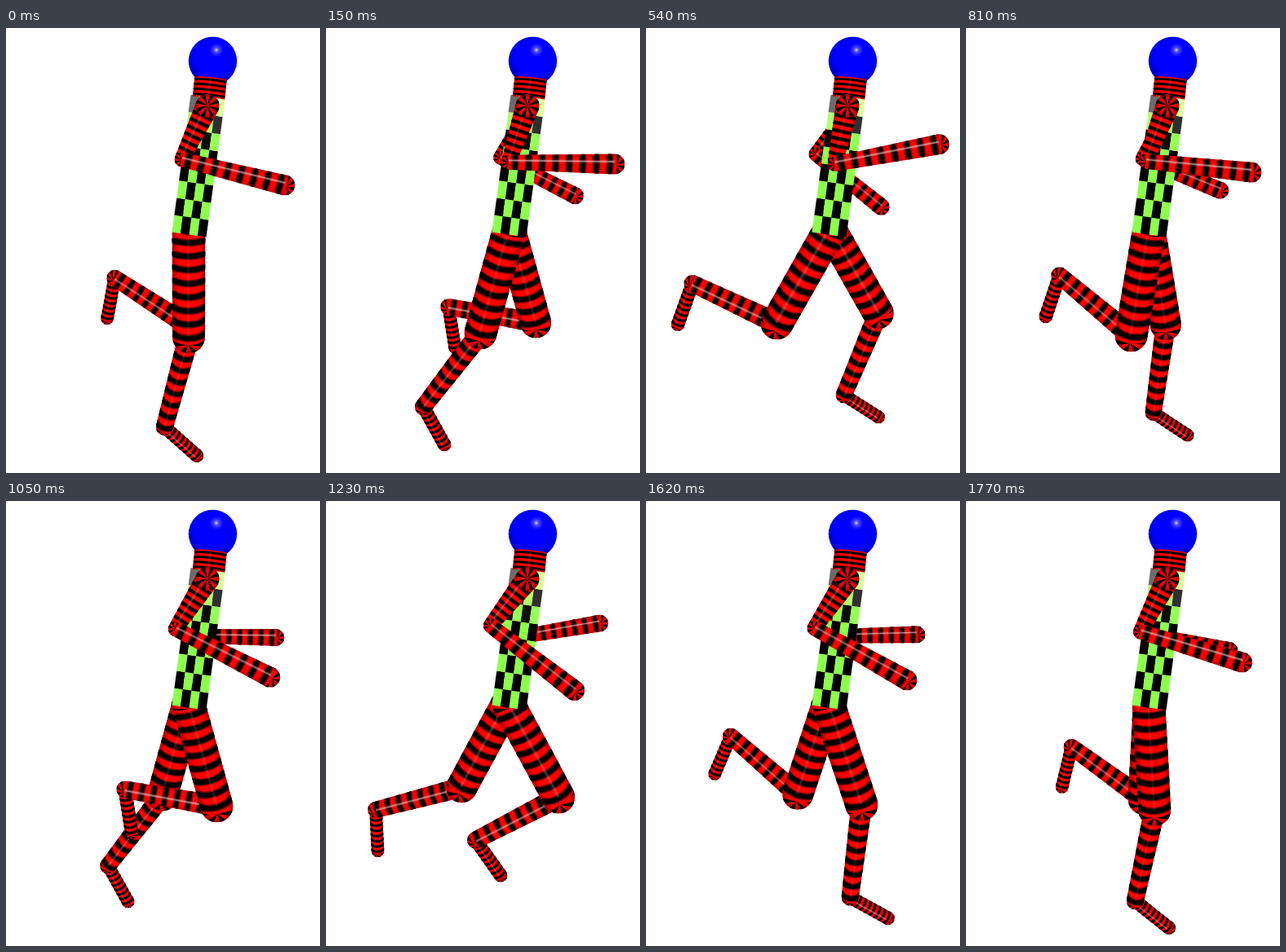
Write an HTML page with a canvas that moves like this. It is 385x546 px and loops after 1.8 s.

```html
<!DOCTYPE html>
<html lang="en">
<head>
<meta charset="utf-8">
<title>Running figure</title>
<style>
html, body { margin: 0; overflow: hidden; background: #fff; }
canvas { display: block; }
</style>
</head>
<body>
<canvas id="stage" width="385" height="546"></canvas>
<script>
const ctx = document.getElementById('stage').getContext('2d');
const TAU = Math.PI * 2, RAD = Math.PI / 180, QUARTER = Math.PI / 2;
const LOOP = 1800, STEP = 30;
const EYE = [240, 110], DEPTH = 540; // vanishing point and camera distance

// Point at a distance from p; the angle is measured from straight down, forward positive.
const reach = ([x, y], len, deg) =>
  [x + len * Math.sin(deg * RAD), y + len * Math.cos(deg * RAD)];
const lean = (x, y) => [(x - EYE[0]) / DEPTH, (y - EYE[1]) / DEPTH];

function polygon(points) {
  ctx.beginPath();
  points.forEach(p => ctx.lineTo(...p));
  ctx.closePath();
}

// Tapered cylinder with curved black rings; its ends curve like the rings.
function limb(a, b, ra, rb, rings = 8) {
  const dx = b[0] - a[0], dy = b[1] - a[1];
  const len = Math.hypot(dx, dy), cos = dx / len, sin = dy / len;
  const r = Math.max(ra, rb), gap = len / rings;

  const ring = (x, radius, back = false) => {
    const k = lean(a[0] + cos * x, a[1] + sin * x);
    const sag = k[0] * cos + k[1] * sin;
    const from = back ? QUARTER : -QUARTER;
    ctx.ellipse(x, 0, radius * Math.abs(sag), radius, 0, from, -from, (sag < 0) !== back);
  };

  ctx.save();
  ctx.translate(...a);
  ctx.rotate(Math.atan2(dy, dx));
  ctx.beginPath();
  ring(len, rb);
  ring(0, ra, true);
  ctx.closePath();
  ctx.clip();
  ctx.fillStyle = '#f00';
  ctx.fillRect(-r, -r, len + 2 * r, 2 * r);

  for (const [width, alpha] of [[.58, .5], [.38, 1]]) {
    ctx.lineWidth = gap * width;
    ctx.strokeStyle = `rgba(0,0,0,${alpha})`;
    for (let i = 0; i < rings; i++) {
      ctx.beginPath();
      ring((i + .5) * gap, r);
      ctx.stroke();
    }
  }

  const shade = ctx.createLinearGradient(0, -r, 0, r);
  shade.addColorStop(0, 'rgba(0,0,0,.35)');
  shade.addColorStop(.18, 'rgba(0,0,0,0)');
  shade.addColorStop(.82, 'rgba(0,0,0,0)');
  shade.addColorStop(1, 'rgba(0,0,0,.35)');
  ctx.fillStyle = shade;
  ctx.fillRect(-r, -r, len + 2 * r, 2 * r);

  const k = lean(a[0] + dx / 2, a[1] + dy / 2);
  const shift = -.35 * cos - k[0] * sin + k[1] * cos;
  const glow = .06 + .45 * cos * cos;
  for (const [width, part] of [[.3, .4], [.12, 1]]) {
    ctx.lineWidth = r * width;
    ctx.strokeStyle = `rgba(255,225,225,${glow * part})`;
    ctx.beginPath();
    ctx.moveTo(0, ra * shift);
    ctx.lineTo(len, rb * shift);
    ctx.stroke();
  }
  ctx.restore();
}

// Sphere with its striped pole turned to the viewer.
function joint([x, y], r) {
  const [kx, ky] = lean(x, y);
  const px = x + r * kx, py = y + r * ky, wedges = 8;
  ctx.save();
  ctx.beginPath();
  ctx.arc(x, y, r, 0, TAU);
  ctx.clip();
  ctx.fillStyle = '#f00';
  ctx.fillRect(x - r, y - r, 2 * r, 2 * r);
  ctx.fillStyle = '#000';
  for (let i = 0; i < wedges; i++) {
    const mid = (i + .5) * TAU / wedges;
    polygon([[px, py], ...[-.18, .18].map(d =>
      [x + 1.1 * r * Math.cos(mid + d), y + 1.1 * r * Math.sin(mid + d)])]);
    ctx.fill();
  }
  const shade = ctx.createRadialGradient(x, y, r * .7, x, y, r);
  shade.addColorStop(0, 'rgba(0,0,0,0)');
  shade.addColorStop(1, 'rgba(0,0,0,.35)');
  ctx.fillStyle = shade;
  ctx.fillRect(x - r, y - r, 2 * r, 2 * r);
  ctx.restore();
}

function leg(hip, phase, s) {
  const sin = Math.sin(phase), cos = Math.cos(phase);
  const thigh = -31 * sin;
  const shin = thigh - 69 + 54 * cos;
  const foot = shin + 88 - 24.5 * cos;
  const knee = reach(hip, 129 * s, thigh);
  const ankle = reach(knee, 114.5 * s, shin);
  const toe = reach(ankle, 53 * s, foot);
  joint(toe, 8.3 * s);
  limb(ankle, toe, 8.3 * s, 8.3 * s);
  joint(ankle, 10.5 * s);
  limb(knee, ankle, 13 * s, 10.5 * s);
  joint(hip, 20 * s);
  joint(knee, 20 * s);
  limb(hip, knee, 20.5 * s, 20 * s);
}

function arm(shoulder, phase, upper, fore, [rs, re, rh]) {
  const sin = Math.sin(phase);
  const elbow = reach(shoulder, upper, -25.5 + 14 * sin);
  const hand = reach(elbow, fore, 76 + 26 * sin);
  limb(shoulder, elbow, rs, re);
  joint(shoulder, rs);
  joint(elbow, re);
  joint(hand, rh);
  limb(elbow, hand, re, rh);
}

function torso() {
  const cols = 4, rows = 8;
  const at = (u, v) =>
    [203.5 + 42 * u / cols + 23 * v / rows, 250.5 + 6 * u / cols - 168.5 * v / rows];
  for (let v = 0; v < rows; v++) {
    const light = Math.max(0, v - 4) ** 2;
    const grey = light * 12;
    for (let u = 0; u < cols; u++) {
      ctx.fillStyle = (u + v) % 2
        ? `rgb(${grey},${grey},${grey})`
        : `rgb(${140 + light * 9},255,${76 + light * 9})`;
      polygon([at(u, v), at(u + 1, v), at(u + 1, v + 1), at(u, v + 1)]);
      ctx.fill();
    }
  }
}

function head() {
  const ball = ctx.createRadialGradient(255, 34, 24, 255, 34, 38);
  ball.addColorStop(0, '#00f');
  ball.addColorStop(1, '#0000a8');
  ctx.fillStyle = ball;
  ctx.beginPath();
  ctx.arc(253.5, 40.5, 29.7, 0, TAU);
  ctx.fill();
  const x = 258, y = 27, r = 9;
  const spot = ctx.createRadialGradient(x, y, 0, x, y, r);
  spot.addColorStop(0, 'rgba(255,255,255,.9)');
  spot.addColorStop(.3, 'rgba(160,160,255,.5)');
  spot.addColorStop(1, 'rgba(80,80,255,0)');
  ctx.fillStyle = spot;
  ctx.fillRect(x - r, y - r, 2 * r, 2 * r);
}

function draw(time) {
  const phase = TAU * time / LOOP;
  ctx.fillStyle = '#fff';
  ctx.fillRect(0, 0, 385, 546);
  arm([248, 105], phase + Math.PI, 64, 103, [11, 8.5, 10.5]);
  leg([224.5, 243.4], phase + Math.PI, .95);
  leg([224, 250], phase, 1);
  torso();
  head();
  limb([251, 62], [248.5, 86], 20, 20, 4);
  arm([247, 95.5], phase, 73, 130, [14.5, 9, 12.5]);
}

const start = performance.now();
function tick() {
  const time = (performance.now() - start) % LOOP;
  draw(Math.floor(time / STEP) * STEP);
  requestAnimationFrame(tick);
}
tick();
</script>
</body>
</html>
```
